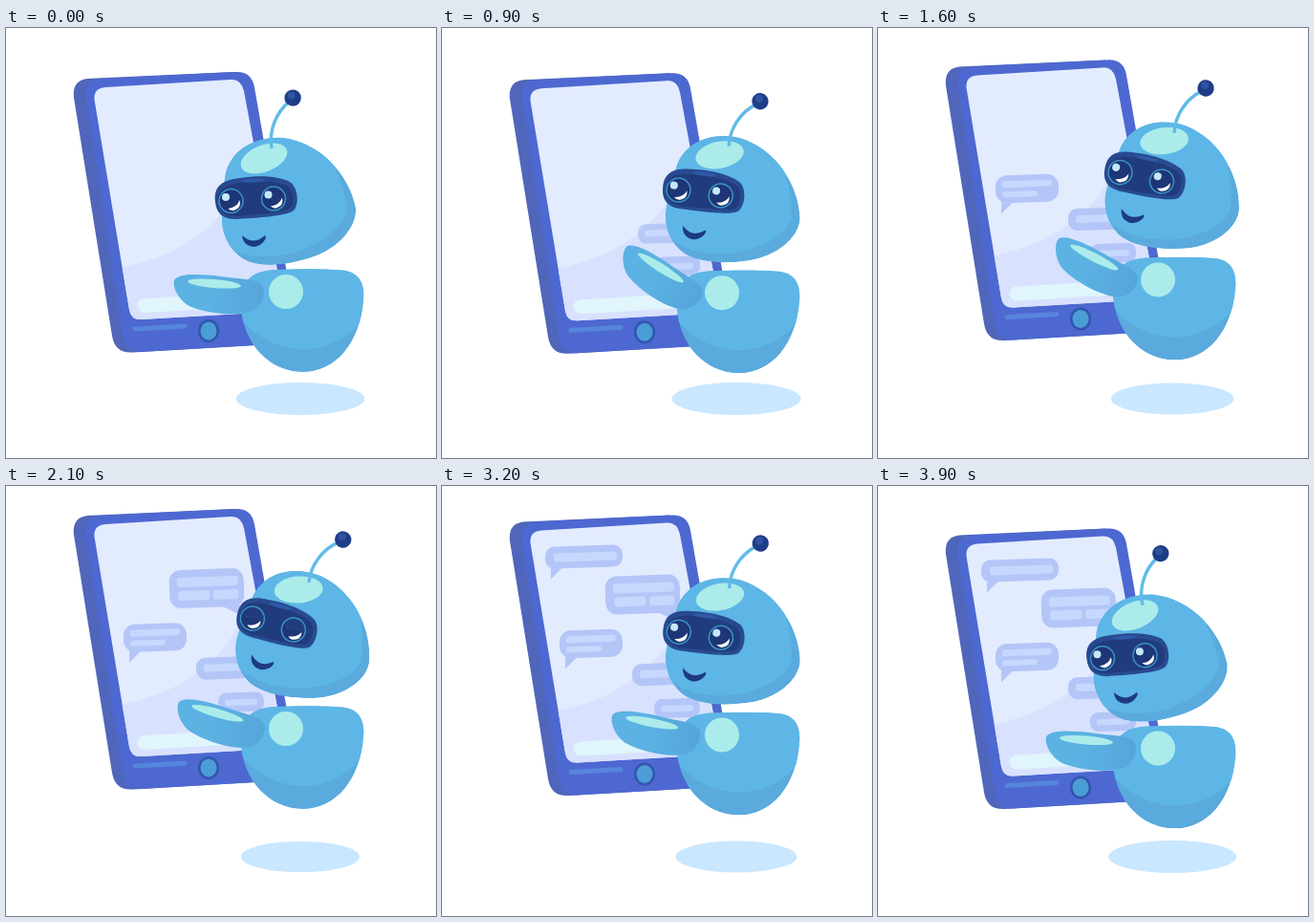
Animation, 450 px wide and 450 px high, one loop 4000 ms. Source, as an HTML page:

```html
<!DOCTYPE html>
<html lang="en">
<head>
<meta charset="utf-8">
<title>Chat robot</title>
<style>
  html, body { margin: 0; width: 100%; height: 100%; overflow: hidden; background: #fff; }
  svg { display: block; width: 100vw; height: 100vh; }
  .mint { fill: #abecea; }
  .blue { fill: #5db6e6; }
  .shade { fill: #5aaadd; }
  .bubble { fill: #b4c5f7; }
  .line { fill: #c7d8fe; }
</style>
</head>
<body>
<svg viewBox="0 0 450 450">
  <defs>
    <linearGradient id="sleeve">
      <stop offset="0.4" stop-color="#5bb2e3"/>
      <stop offset="1" stop-color="#56a5da"/>
    </linearGradient>
    <path id="skull" d="M229 158C232 130 258 113 290 115C330 120 360 155 366 188C368 208 348 231 320 240C298 247 275 251 255 245C238 238 228 222 226 204C226 190 227 170 229 158Z"/>
    <path id="torso" d="M246 292C246 268 252 255 281 253C306 252 335 252 352 253.500C370 255 376 268 374 285C371 328 346 360 311 360C275 360 248 330 246 292Z"/>
    <path id="screen" d="M92.500 75Q91.500 63 104 62L235 54Q246 53 249 66L289 281Q291 296 279 297L142 305Q131 306 129 295Z"/>
    <clipPath id="inSkull"><use href="#skull"/></clipPath>
    <clipPath id="inTorso"><use href="#torso"/></clipPath>
    <clipPath id="inScreen"><use href="#screen"/></clipPath>
    <clipPath id="inEye"><circle r="11.5"/></clipPath>
    <g id="eye">
      <circle r="13" fill="#1e3576"/>
      <g clip-path="url(#inEye)">
        <circle cx="-5.500" cy="-4" r="4" fill="#c4e8fa"/>
        <path d="M-3 8Q6 7 9 -1Q11 7 4 9.500Q0 11 -3 8Z" fill="#fff"/>
        <rect class="lid" x="-13" y="-39" width="26" height="26" fill="#213c7c"/>
      </g>
      <circle r="12.5" fill="none" stroke="#3a94c4" stroke-width="1.5"/>
    </g>
  </defs>

  <ellipse id="shadow" cx="308" cy="388" fill="#c9e7ff"/>

  <g id="scene">
    <path fill="#4f66ba" d="M71 73Q69 55 85 53L238 46L250 52L290 322L262 332L133 339.500Q114 341 111 322Z"/>
    <path fill="#4d68d0" d="M83 72Q82 55 97 53L240 46Q257 45 260 62L304 314Q307 329 294 330L141 339Q125 340 122 323Z"/>
    <use href="#screen" fill="#e3ebff"/>
    <path clip-path="url(#inScreen)" fill="#d8e1fe" d="M115 252C170 242 212 218 239 176Q249 158 266 151L300 310L120 315Z"/>
    <path d="M145 290.500L255 284" stroke="#e0f5fc" stroke-width="15" stroke-linecap="round"/>
    <path d="M135 315L187 312" stroke="#5685dc" stroke-width="5" stroke-linecap="round"/>
    <ellipse cx="212" cy="317" rx="11" ry="12" fill="#3155ae"/>
    <ellipse cx="212" cy="317" rx="8.500" ry="9.500" fill="#4b9dd5"/>

    <g id="chat"></g>

    <g clip-path="url(#inTorso)">
      <use href="#torso" class="shade"/>
      <path class="blue" d="M240 245H380V294C352 346 282 350 246 304Z"/>
    </g>
    <circle class="mint" cx="293" cy="276" r="18"/>

    <g id="arm">
      <path fill="url(#sleeve)" d="M176 264C180 257 200 257 225 260C245 263 260 262 267 268C273 275 269 290 258 296C240 303 205 298 190 290C181 284 174 272 176 264Z"/>
      <ellipse class="mint" cx="218" cy="267.500" rx="28" ry="4.500" transform="rotate(5 218 267.500)"/>
    </g>

    <g id="head">
      <g clip-path="url(#inSkull)">
        <use href="#skull" class="shade"/>
        <path class="blue" d="M215 105H312C338 128 354 160 357 190C352 210 330 226 302 235C275 242 248 242 222 224Z"/>
      </g>
      <g id="crown">
        <ellipse class="mint" cx="270" cy="136.500" rx="25.500" ry="14" transform="rotate(-21 270 136.500)"/>
        <g id="antenna">
          <path d="M278 126C275 108 283 88 298 77" fill="none" stroke="#62bbe7" stroke-width="3.500"/>
          <circle cx="301" cy="73.500" r="8.700" fill="#1e3d88"/>
          <circle cx="299.500" cy="71" r="4" fill="#2f549f"/>
        </g>
      </g>
      <g id="face">
        <path fill="#284a90" d="M219 182C217 166 226 159 245 157C265 154 285 155 297 161C306 167 307 185 301 191C294 197 260 199 240 200C226 200 220 193 219 182Z"/>
        <path fill="#213c7c" d="M222 182C221 170 228 164 246 162C265 160 283 160 294 165C302 170 302 184 298 188C291 194 260 195 241 197C228 197 223 191 222 182Z"/>
        <ellipse cx="259" cy="159.500" rx="12" ry="2" fill="#2f5aa9" transform="rotate(-3 259 159.500)"/>
        <use href="#eye" x="235.500" y="181"/>
        <use href="#eye" x="280" y="178.500"/>
        <path fill="#1e3a83" d="M247 217Q259 228 271 217Q273 219 270 223C264 231 255 230 250 225Q247 221 247 217Z"/>
      </g>
    </g>
  </g>
</svg>
<script>
const LOOP = 4000, STEP = 100, SPAN = LOOP / STEP;
const $ = id => document.getElementById(id);

// Keys are [step, value]; values are joined by a smooth closed curve.
const bob = [[0, 0], [5, 2.5], [12, -2], [18, -18], [21, -22], [24, -22.6], [28, -20], [32, -15.5], [36, -7.5], [39, -1.5]];
const nod = [[0, 0], [5, 7], [12, 11.5], [21, 17], [25, 18.8], [28, 18.5], [30, 15], [32, 10], [36, 2], [39, -0.5]];
const sway = [[0, -1], [5, 4], [12, -1], [21, -2], [28, 9], [32, 1], [39, -4]];
const lift = [[0, 0], [5, 19], [12, 29], [21, 11], [28, 6.5], [32, 6], [39, 0]];

function curve(keys, t) {
  const n = keys.length;
  const at = i => {
    const [x, y] = keys[(i + n) % n];
    return [x + Math.floor(i / n) * SPAN, y];
  };
  const slope = i => {
    const a = at(i - 1), b = at(i + 1);
    return (b[1] - a[1]) / (b[0] - a[0]);
  };
  let i = n - 1;
  while (keys[i][0] > t) i--;
  const [x0, y0] = at(i), [x1, y1] = at(i + 1);
  const d = x1 - x0, u = (t - x0) / d, v = 1 - u;
  return v * v * ((1 + 2 * u) * y0 + u * d * slope(i))
       + u * u * ((1 + 2 * v) * y1 - v * d * slope(i + 1));
}

// Boxes and lines are [x, y, width, height].
const bubbles = [
  { start: 3, box: [222, 238, 48, 20], lines: [[229, 245, 34, 6.5]] },
  { start: 7, box: [199, 201, 57, 23], lines: [[207, 208, 44, 8]] },
  { start: 10, box: [123, 166, 66, 29], left: true, lines: [[130, 172, 52, 7], [130, 183, 37, 6]] },
  { start: 18, box: [171, 109, 78, 40], lines: [[179, 117, 64, 10], [180, 131, 33, 10], [217, 131, 26, 10]], right: true },
  { start: 23, box: [108, 78, 81, 23], left: true, lines: [[117, 85, 66, 9]] }
];

const bar = ([x, y, w, h], cls, r) =>
  `<rect class="${cls}" x="${x}" y="${y}" width="${w}" height="${h}" rx="${r}"/>`;

for (const b of bubbles) {
  const [x, y, w, h] = b.box, low = y + h, end = x + w;
  let tail = "";
  if (b.left) tail = `M${x + 6} ${low - 5}L${x + 5} ${low + 11}L${x + 19} ${low - 2}Z`;
  if (b.right) tail = `M${end - 26} ${low - 2}L${end + 1} ${low + 12}L${end - 8} ${low - 8}Z`;
  b.cx = b.left ? x + 5 : end;
  b.cy = low;
  b.node = document.createElementNS("http://www.w3.org/2000/svg", "g");
  b.node.innerHTML = `<g transform="rotate(-2 ${x + w / 2} ${y + h / 2})"><path class="bubble" d="${tail}"/>`
    + bar(b.box, "bubble", Math.min(12, h * 0.42)) + b.lines.map(l => bar(l, "line", 3)).join("") + "</g>";
  $("chat").append(b.node);
}

const move = (id, value) => $(id).setAttribute("transform", value);
const lid = document.querySelector(".lid");
const blink = (t, mid) => Math.max(0, 1 - Math.abs(t - mid) / 2);

function draw(t) {
  const y = curve(bob, t), a = curve(nod, t);
  move("scene", `translate(0 ${y})`);
  move("head", `translate(0 ${a * 0.18}) rotate(${a} 317 243)`);
  move("crown", `translate(${a * 0.17} ${a * -0.05})`);
  move("antenna", `rotate(${curve(sway, t)} 278 125)`);
  move("face", `rotate(${a * 0.1} 317 180)`);
  move("arm", `rotate(${curve(lift, t)} 260 281)`);
  $("shadow").setAttribute("rx", 67.3 + y * 0.24);
  $("shadow").setAttribute("ry", 17 + y * 0.04);
  lid.setAttribute("y", -39 + 26 * Math.max(blink(t, 5), blink(t, 22)));
  for (const b of bubbles) {
    const u = Math.min(1, Math.max(0, (t - b.start) / 3));
    const s = 1 - (1 - u) ** 2;
    b.node.setAttribute("transform", `translate(${b.cx} ${b.cy}) scale(${s}) translate(${-b.cx} ${-b.cy})`);
    b.node.setAttribute("opacity", s);
  }
}

let begin;
function tick(now) {
  begin ??= now;
  draw(Math.floor((now - begin) % LOOP / STEP));
  requestAnimationFrame(tick);
}
draw(0);
requestAnimationFrame(tick);
</script>
</body>
</html>
```
